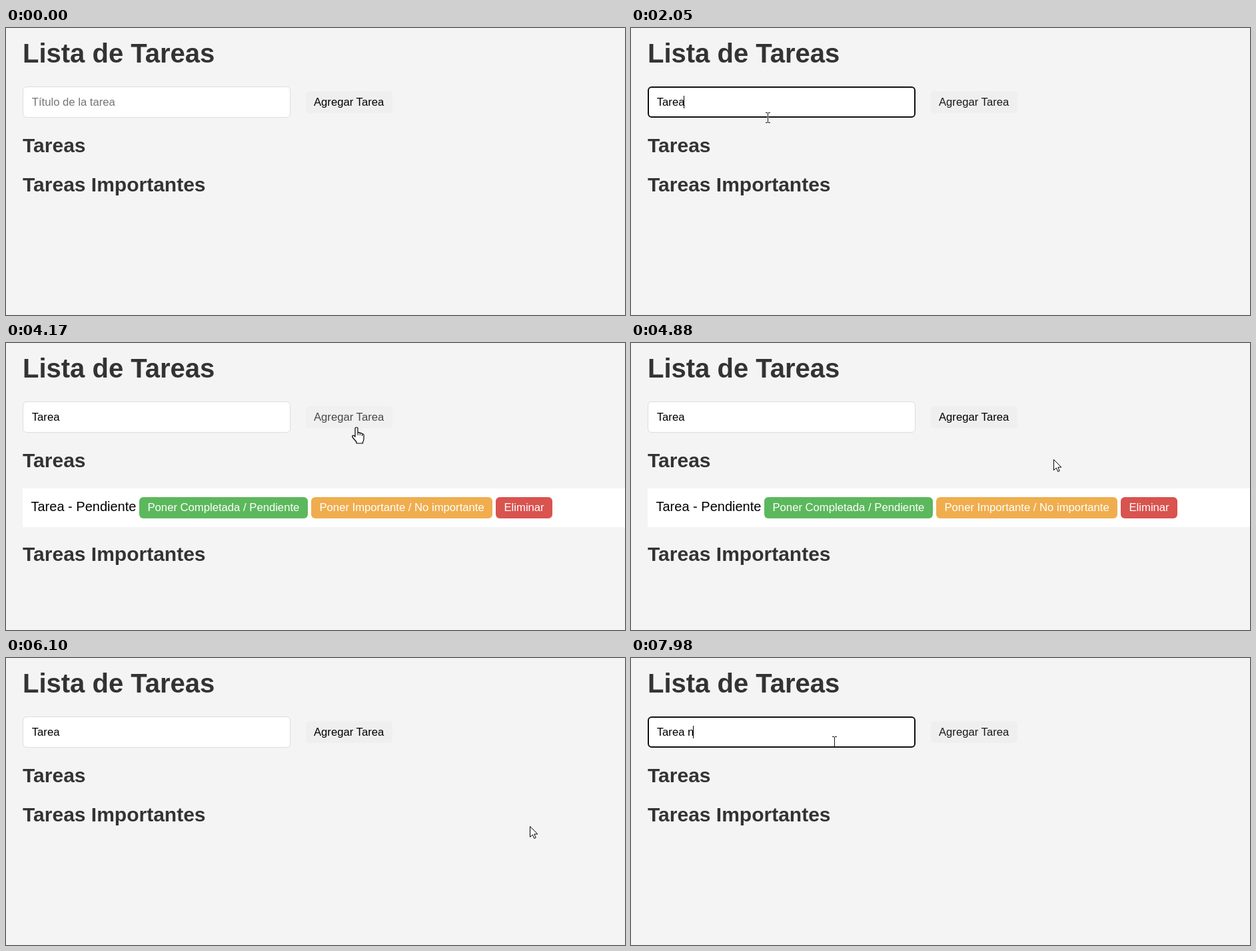
An HTML page for the animation above (8 s loop, 929x432 px).

```html
<!DOCTYPE html>
<html lang="es">
<head>
<meta charset="utf-8">
<title>Lista de Tareas</title>
<style>
  html, body { margin: 0; width: 100%; height: 100%; overflow: hidden; background: #f4f4f4; }
  svg { display: block; width: 929px; height: 432px; }
  text { font: 16.667px "Liberation Sans", Arial, sans-serif; white-space: pre; }
  .h1, .h2 { font-weight: bold; fill: #333; }
  .h1 { font-size: 40px; }
  .h2 { font-size: 30px; }
  .item { font-size: 20px; }
  .row .label { fill: #fff; }
  .outline { fill: #fff; stroke: #000; stroke-linejoin: round; }
</style>
</head>
<body>
<svg viewBox="0 0 929 432">
  <rect width="929" height="432" fill="#f4f4f4"/>
  <text class="h1" x="25" y="52">Lista de Tareas</text>

  <rect id="box" x="25.5" y="88.5" width="401" height="46" rx="5.5" fill="#fff" stroke="#ddd"/>
  <rect id="focus" x="26" y="89" width="400" height="45" rx="5" fill="#fff" stroke="#101010" stroke-width="2"/>
  <text id="field" x="38.75" y="117"></text>
  <rect id="caret" y="102" width="1" height="19"/>

  <g id="add">
    <rect x="450" y="95" width="130" height="33" rx="5" fill="#efefef"/>
    <text id="addLabel" x="462" y="117">Agregar Tarea</text>
  </g>

  <text class="h2" x="25" y="187">Tareas</text>
  <g id="row" class="row">
    <rect x="25" y="219" width="904" height="58" fill="#fff"/>
    <text class="item" x="37.5" y="253">Tarea - Pendiente</text>
    <rect x="200" y="232" width="253" height="32" rx="6" fill="#5cb85c"/>
    <text class="label" x="212.5" y="253">Poner Completada / Pendiente</text>
    <rect x="458" y="232" width="272" height="32" rx="6" fill="#f0ad4e"/>
    <text class="label" x="470.5" y="253">Poner Importante / No importante</text>
    <g id="remove">
      <rect x="735" y="232" width="85" height="32" rx="6" fill="#d9534f"/>
      <text class="label" x="747.5" y="253">Eliminar</text>
    </g>
  </g>
  <text id="important" class="h2" x="25">Tareas Importantes</text>

  <g id="pointer">
    <circle id="click" r="15" fill="#ff0" fill-opacity=".47"/>
    <path id="arrow" class="outline" d="M.5 .5V16.5L4.3 13L6.8 18.6L9.2 17.5L6.8 12H11.8Z"/>
    <g id="hand">
      <path class="outline" stroke-width="1.2" d="M-1 13V2Q-1 0 1 0T3 2V8Q5 7 6.3 8.5Q8.5 8 9.5 10Q12 9.5 12 12V17Q12 20 10.5 22V24H1V22L-4.5 15.5Q-6 13.5-4.7 12.5Q-3.3 11.500-1 14Z"/>
      <path fill="none" stroke="#000" d="M3 8V12M6.300 8.500V12M9.500 10V13"/>
    </g>
    <g id="ibeam" fill="none">
      <path stroke="#fff" stroke-width="2.6" stroke-opacity=".7" d="M2.500-6V8"/>
      <path stroke="#111" d="M-1 -6.500H2M3-6.500H6M2.500-6V8M-1 8.500H2M3 8.500H6"/>
    </g>
  </g>
</svg>
<script>
const LOOP = 8000;
const el = id => document.getElementById(id);
const clamp = v => Math.max(0, Math.min(1, v));
const within = (t, ...spans) => spans.some(([a, b]) => t >= a && t < b);
const smooth = p => p * p * (3 - 2 * p);
const show = (id, on) => el(id).setAttribute('visibility', on ? 'inherit' : 'hidden');

// Pointer moves: start, end, then the points passed on the way
const moves = [
  [130, 710, [712, 430], [430, 268], [203, 134]],
  [2570, 3260, [203, 134], [350, 140], [522, 135]],
  [3540, 3580, [522, 135], [524, 133]],
  [3580, 3750, [524, 133], [525, 127]],
  [4620, 5160, [525, 127], [640, 178], [778, 236]],
  [5160, 5400, [778, 236], [786, 242], [786, 253]],
  [6410, 7070, [786, 253], [545, 185], [303, 125]]
];
// Typed text: time, value, caret x
const typing = [
  [0, '', 39], [1490, 'T', 48], [1640, 'Ta', 55], [1800, 'Tar', 61], [1870, 'Tare', 70],
  [2050, 'Tarea', 79], [7750, 'Tarea ', 84], [7980, 'Tarea n', 93]
];
const clicks = [[950, 1180], [3960, 4170], [5900, 6100], [7360, 7590]];

function pointerAt(t) {
  const [start, end, ...pts] = moves.filter(m => t >= m[0]).pop() || moves[0];
  const s = smooth(clamp((t - start) / (end - start))) * (pts.length - 1);
  const i = Math.min(Math.floor(s), pts.length - 2);
  return pts[i].map((v, k) => Math.round(v + (pts[i + 1][k] - v) * (s - i)));
}

function hover(id, t, on, off) {
  const amount = clamp((t - on) / 130) - clamp((t - off) / 130);
  el(id).setAttribute('opacity', 1 - .3 * amount);
}

function draw(t) {
  const [, value, caretX] = typing.filter(k => t >= k[0]).pop();
  const focused = within(t, [950, 3960], [7360, LOOP]);
  el('field').textContent = value || 'Título de la tarea';
  el('field').setAttribute('fill', value ? '#000' : '#757575');
  el('caret').setAttribute('x', caretX);
  show('focus', focused);
  show('caret', within(t, [990, 2570], [3075, 3600], [7380, LOOP]));
  el('addLabel').setAttribute('fill', focused ? '#1a1a1a' : '#000');

  const listed = within(t, [4170, 6100]);
  show('row', listed);
  el('important').setAttribute('y', listed ? 328 : 246);
  hover('add', t, 3620, 4650);
  hover('remove', t, 5080, 6100);

  const [x, y] = pointerAt(t);
  const inField = x < 427 && y < 136;
  const onButton = within(t, [3620, 4650], [5080, 6100]);
  el('pointer').setAttribute('transform', `translate(${x} ${y})`);
  show('pointer', t >= 130);
  show('click', within(t, ...clicks));
  show('ibeam', inField);
  show('hand', onButton);
  show('arrow', !inField && !onButton);
}

const begin = performance.now();
function tick() {
  draw((performance.now() - begin) % LOOP);
  requestAnimationFrame(tick);
}
tick();
</script>
</body>
</html>
```
